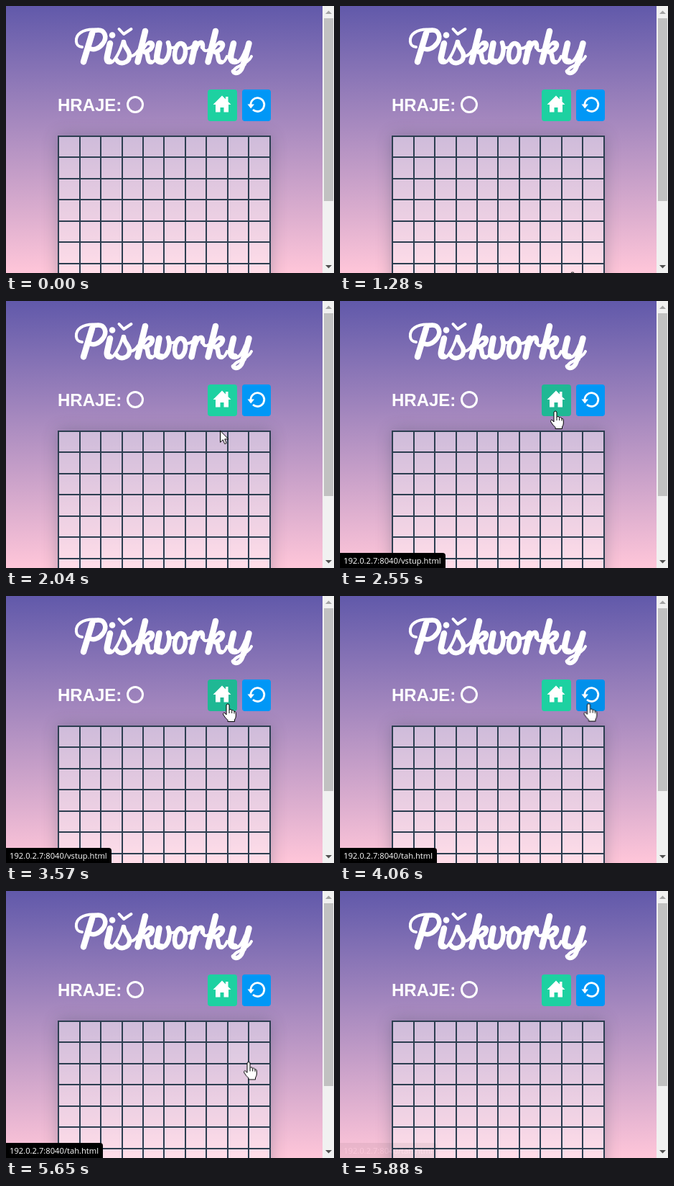
These frames come from a looping animation (457 by 371 pixels, 6.29 s). An HTML page:

```html
<!DOCTYPE html>
<html lang="cs">
<head>
<meta charset="utf-8">
<title>Piškvorky</title>
<style>
html, body { margin: 0; width: 100%; height: 100%; overflow: hidden; }
body { position: relative; background: linear-gradient(#6159aa, #ffc6d9) 0 0 / 100% 371px no-repeat; }
.board {
  position: absolute; left: 72px; top: 180px; width: 297px; height: 297px;
  background: rgba(255, 255, 255, .4); box-shadow: 0 0 20px rgba(44, 62, 80, .3);
}
svg { position: absolute; left: 0; top: 0; display: block; }
.line { fill: none; stroke: #fff; stroke-linecap: round; stroke-linejoin: round; }
.thick { stroke-width: 8.5; }
.mid { stroke-width: 6.5; }
.thin { stroke-width: 4; }
.label { font: bold 24px "Liberation Sans", Arial, sans-serif; fill: #fff; }
.status { font: 11.2px "Open Sans", "Noto Sans", sans-serif; fill: #fff; }
.cursor path { fill: #fff; stroke: #000; stroke-width: 1; stroke-linejoin: round; }

.cursor, .hand, .arrow, .home, .reload, .cell, .bubble, .first, .second {
  animation: 6290ms linear infinite;
}
.cursor { animation-name: move; }
.hand { animation-name: hand; animation-timing-function: step-end; }
.arrow { animation-name: arrow; animation-timing-function: step-end; }
.home { fill: #1dd1a1; animation-name: home; }
.reload { fill: #0197f6; animation-name: reload; }
.cell { fill: #fff; opacity: 0; animation-name: cell; }
.bubble { animation-name: bubble; }
.first { animation-name: first; animation-timing-function: step-end; }
.second { animation-name: second; animation-timing-function: step-end; }

@keyframes move {
  0%, 20.34% { transform: translate(324px, 385px); }
  20.35% { transform: translate(324px, 370px); }
  22.26% { transform: translate(317px, 332px); }
  24.64% { transform: translate(308px, 275px); }
  27.03% { transform: translate(301px, 231px); }
  30.05%, 30.84% { transform: translate(298px, 206px); }
  32.43% { transform: translate(298px, 180px); }
  33.86% { transform: translate(299px, 164px); }
  35.77%, 54.37% { transform: translate(300px, 153px); }
  56.76%, 59.62% { transform: translate(309px, 150px); }
  61.21% { transform: translate(322px, 150px); }
  62.8% { transform: translate(338px, 149.5px); }
  64.07%, 84.58% { transform: translate(346.5px, 149.5px); }
  86.17% { transform: translate(345px, 158px); }
  87.92% { transform: translate(341px, 190px); }
  89.83% { transform: translate(338px, 237px); }
  91.41% { transform: translate(336px, 300px); }
  92.85%, 100% { transform: translate(335px, 385px); }
}
@keyframes hand {
  0%, 34.2%, 62%, 87.4% { opacity: 1; }
  31.8%, 61.2%, 86.3% { opacity: 0; }
}
@keyframes arrow {
  0%, 34.2%, 62%, 87.4% { opacity: 0; }
  31.8%, 61.2%, 86.3% { opacity: 1; }
}
@keyframes home {
  0%, 34.2% { fill: #1dd1a1; }
  36.6%, 61.2% { fill: #1fb894; }
  63.6%, 100% { fill: #1dd1a1; }
}
@keyframes reload {
  0%, 62% { fill: #0197f6; }
  64.4%, 86.3% { fill: #0190eb; }
  88.5%, 100% { fill: #0197f6; }
}
@keyframes cell {
  0%, 88.4% { opacity: 0; }
  89.8% { opacity: .12; }
  92%, 100% { opacity: 0; }
}
@keyframes bubble {
  0%, 36.6% { opacity: 0; }
  40.2%, 90.7% { opacity: 1; }
  93.4%, 100% { opacity: .06; }
}
@keyframes first { 0% { opacity: 1; } 63.2%, 100% { opacity: 0; } }
@keyframes second { 0% { opacity: 0; } 63.2%, 100% { opacity: 1; } }
</style>
</head>
<body>
<div class="board"></div>
<svg width="457" height="371" viewBox="0 0 457 371">
  <defs>
    <g id="k">
      <path class="thick" d="M194 35 L183.500 77.500"/>
      <path class="thin" d="M187 64 C192 62 194 51 201 50"/>
      <path class="mid" d="M200 51.500 C207 50 205 61 193 64 C200 64 195 78 202 78"/>
      <path class="thin" d="M202 79 C206 79 208 75 210 70"/>
    </g>
  </defs>

  <g class="line" role="img" aria-label="Piškvorky">
    <path class="thin" d="M106 57 C96 57 95 43 104 37 C111 32 122 32 130 33"/>
    <path class="mid" d="M124 34 C139 31 141 44 135 52 C130 59 122 62 117 59"/>
    <path class="thick" d="M120 38 L108 77.500"/>
    <path class="thick" d="M145 52 L141 70 C140 76 142 77 144 77"/>
    <path class="thin" d="M145 79 C150 79 158 66 163 49"/>
    <path class="thick" d="M148 40.500 h.1"/>
    <path class="mid" d="M164 50 C165 59 173 62 172 70 C171 80 158 82 154 75"/>
    <path class="thin" d="M172 70 C177 70 181 67 184 62 M157.500 32 L164 39 L174.500 32"/>
    <use href="#k"/>
    <path class="thick" d="M213.500 52 L210.500 68 C209 76 213 77.500 217 77.500"/>
    <path class="mid" d="M217 78 C226 77 230 62 226 51"/>
    <path class="thin" d="M227 54 C228 59 233 59 237 56"/>
    <path class="mid" d="M244 52 C235 51 231 77 240 78 C251 79 254 53 244 52"/>
    <path class="thin" d="M246 54 C248 61 256 60 261 55"/>
    <path class="thick" d="M264 52 L258.500 77.500"/>
    <path class="mid" d="M264 60 C267 50 275 47 274 57"/>
    <path class="thin" d="M274 58 C276 64 282 63 285 58"/>
    <use href="#k" x="98"/>
    <path class="thick" d="M317 52 L313.500 67 C312 75 315 77.500 319 77"/>
    <path class="thin" d="M319 79 C326 79 330 70 333 62"/>
    <path class="thick" d="M338.500 52 L331 80"/>
    <path class="mid" d="M330.500 81 C328 94 319 95 317 91"/>
    <path class="thin" d="M317 92 C315 84 337 82 342 70"/>
  </g>

  <text class="label" x="72" y="146">HRAJE:</text>
  <circle class="line" cx="180" cy="137" r="10.500" stroke-width="3"/>

  <rect class="home" x="281" y="116" width="41" height="44" rx="4"/>
  <path fill="#fff" d="M301 124.500 L306 129.500 V126 H309.500 V133 L313.500 137 H310 V147.500 H303.500 V141 H298.500 V147.500 H292 V137 H288.500 Z"/>
  <rect class="reload" x="329" y="116" width="40" height="44" rx="4"/>
  <path fill="none" stroke="#fff" stroke-width="2.800" d="M341 138 A9.400 9.400 0 1 1 344 144"/>
  <path fill="#fff" d="M336.500 136.500 H346 L341.200 142.500 Z"/>

  <rect class="cell" x="310" y="211" width="27" height="28"/>
  <path id="grid" fill="none" stroke="#2c3e50" stroke-width="2"/>

  <rect x="441" width="16" height="371" fill="#f1f1f1"/>
  <rect x="443" y="17" width="13" height="254" fill="#c1c1c1"/>
  <path fill="#a3a3a3" d="M445 11 L449.500 6.500 L454 11 Z"/>
  <path fill="#505050" d="M445 360 L449.500 364.500 L454 360 Z"/>

  <g class="bubble">
    <g class="first">
      <path d="M0 350 H143 Q147 350 147 354 V371 H0 Z"/>
      <text class="status" x="5" y="365">192.0.2.7:8040/vstup.html</text>
    </g>
    <g class="second">
      <path d="M0 350 H131 Q135 350 135 354 V371 H0 Z"/>
      <text class="status" x="5" y="365">192.0.2.7:8040/tah.html</text>
    </g>
  </g>

  <g class="cursor">
    <g class="hand">
      <path d="M-2 15 V2 Q-2 0 0 0 Q2 0 2 2 V8.500 Q2.500 7.500 4 7.500 Q5.500 7.700 5.700 9.500 Q6.200 8.500 7.500 8.800 Q9 9.200 9 11 Q9.500 10 10.500 10.600 Q11.300 11.200 11.300 13 V17 Q11.200 19.500 9.500 22 V24.500 H0 V22.500 Q-3.500 19.500 -6.200 15 Q-7 13 -5.500 12.300 Q-4 12 -2 15 Z"/>
      <path d="M2 8.500 V13 M5.700 9.500 V13 M9 11 V13.500"/>
    </g>
    <path class="arrow" d="M.5 .5 V16.500 L4.200 13 L6.700 18.700 L9.200 17.600 L6.700 12 H11.800 Z"/>
  </g>
</svg>
<script>
const pitch = 29.42;
let d = "";
for (let i = 0; i <= 10; i++) {
  const x = Math.round(73.35 + pitch * i);
  const y = Math.round(181 + pitch * i);
  d += `M${x} 180V477M72 ${y}H369`;
}
document.getElementById("grid").setAttribute("d", d);
</script>
</body>
</html>
```
